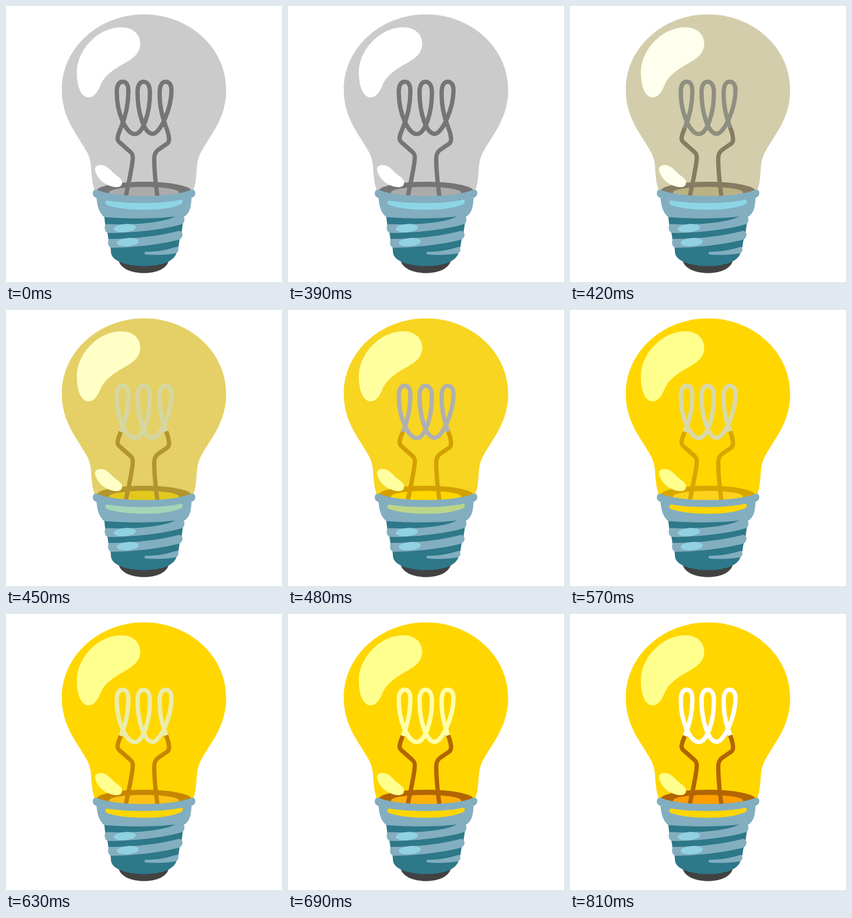
An HTML page with a canvas that plays this animation: 512 px wide and 512 px high, repeating every 2160 ms.

```html
<!DOCTYPE html>
<html lang="en">
<head>
<meta charset="utf-8">
<title>Light bulb</title>
<style>
html, body { margin: 0; width: 100%; height: 100%; overflow: hidden; background: #fff; }
canvas { display: block; width: 100vw; height: 100vh; object-fit: contain; }
</style>
</head>
<body>
<canvas id="stage" width="512" height="512"></canvas>
<script>
const ctx = document.getElementById('stage').getContext('2d');
const LOOP = 2160, STEP = 30;

const shape = d => new Path2D(d);
const oval = (x, y, rx, ry, tilt = 0) => {
  const p = new Path2D();
  p.ellipse(x, y, rx, ry, tilt, 0, Math.PI * 2);
  return p;
};

const glass = shape(`M256 15.5C340 15.5 408.5 78 408.5 155C408.5 208 380 238 363 269
  C352 288 355 302 352.5 318C351.5 329 349.5 338 345.5 346H166.5C162.5 338 160.5 329 159.5 318
  C157 302 160 288 149 269C132 238 103.5 208 103.5 155C103.5 78 172 15.5 256 15.5Z`);
const shine = shape(`M214 39.5C235 39.5 249 52 249 70C249 86 238 96 222 105
  C200 117 183 129 176 145C171 157 165 170 152 169.5C138 168 131 146 131.5 122
  C132 82 170 39.5 214 39.5Z`);
const glint = shape(`M166 307C162 297 172 293 182 296C190 299 195 306 202 312
  C208 317 217 321 215 330C213 338 201 337 191 333C178 328 169 318 166 307Z`);
const rim = oval(256, 343.5, 88, 17.5);
const floor = oval(256, 346, 65, 10.5);

const stems = shape(`M213 226C210 234 207 239 207 246C207 250 209 252 213 255L230 270
  C235 274 236 278 235 285C233 305 228 325 222 354
  M297 225C301 235 302.5 243 302.5 248C302.5 253 299 256 295 258L282 267
  C277 271 275 275 275 283C275 305 277 325 281 354`);
const coil = shape(`M213 226C222 205 227 180 227 158C227 146 223 140.5 217 140.5
  C209 140.5 205.5 148 205.5 160C205.5 199 223 237.5 239 237.5
  C254 237.5 267 199 267 161C267 147 262 140.5 255 140.5
  C248 140.5 244 148 244 160C244 197 256 237 272 237
  C286 237 307 190 307 156C307 146 303 140.5 296 140.5
  C289 140.5 285 148 285 162C285 190 291 208 297 225`);

const tip = shape('M209 472C212 487 233 495.5 256 495.5C279 495.5 299 487 302 472Z');
const screw = shape(`M182 388L184 405L188 420L190 432L194 449L195 459
  C198 474 226 482.5 256 482.5C288 482.5 311 474 316 459L320 446L322 433L326 418L328 404L330 388Z`);
const collar = shape(`M168 341C190 349.5 222 352.5 256 352.5C290 352.5 322 349.5 344 341
  C350 340 352 345 351 349C350 353 347 355 344 356C344 373 340 386 330 391
  C332 396 331 402 327 404.5C300 413 245 421 190 421C182 420 181 406 187 404.5
  C235 407 292 402 314 390.5C275 395 220 395 182 391.5
  C172 383 169 370 168 356C164 355 161 352 161 348C161 343 164 340 168 341Z`);
const thread = shape(`M192 432C235 432 285 427 321 417C329 418 330 429 322 433
  C290 442 238 448 195 448.5C188 446 188 434 192 432Z`);
const threadEnd = shape(`M259 456C281 456 301 452 317 446.5C321 448 321 456 316 458.5
  C298 462 277 462.5 259 461C256 460 256 457 259 456Z`);
const band = shape(`M188 361C230 367.5 290 367 324 359.5C329 359 329 364 326 367
  C310 375 285 378 256 378C225 378 200 374 187 369C183 366 183 361 188 361Z`);
const spots = [oval(220.5, 412, 20.5, 7.6, -0.08), oval(226, 438, 20.5, 7.6, -0.08)];

// Each colour track: time in ms, then colour.
const tracks = {
  glass: [[390, 'cbcbcb'], [420, 'd3cdab'], [450, 'e4d066'], [480, 'f7d521'], [510, 'ffd600']],
  shine: [[390, 'ffffff'], [420, 'ffffed'], [450, 'ffffc6'], [480, 'ffff9f'], [510, 'ffff8d']],
  stem: [[390, '757575'], [420, '867c62'], [450, 'b2952e'], [480, 'd3a000'], [570, 'd9a600'],
    [690, 'b26500']],
  floor: [[390, 'ababab'], [420, 'bbb283'], [450, 'e3c81c'], [480, 'ffd600'], [570, 'ffd21c'],
    [690, 'ffb00a'], [810, 'ff9e00']],
  coil: [[390, '757575'], [420, '8f8f80'], [450, 'd6d6a2'], [480, 'b0b0b0'], [570, 'd9d9a9'],
    [690, 'ffffaa'], [810, 'ffffff']],
  band: [[420, '8dd5e5'], [570, 'ffd600']]
};

const rgb = hex => [0, 2, 4].map(i => parseInt(hex.slice(i, i + 2), 16));

function colour(name, t) {
  const keys = tracks[name];
  const next = keys.findIndex(k => k[0] > t);
  if (next === 0) return '#' + keys[0][1];
  if (next < 0) return '#' + keys[keys.length - 1][1];
  const [t0, c0] = keys[next - 1], [t1, c1] = keys[next];
  const a = rgb(c0), b = rgb(c1), u = (t - t0) / (t1 - t0);
  return `rgb(${a.map((v, i) => Math.round(v + (b[i] - v) * u))})`;
}

function fill(path, style) {
  ctx.fillStyle = style;
  ctx.fill(path);
}

function line(path, style) {
  ctx.strokeStyle = style;
  ctx.stroke(path);
}

function draw(t) {
  ctx.fillStyle = '#fff';
  ctx.fillRect(0, 0, 512, 512);
  ctx.lineWidth = 8;
  ctx.lineJoin = 'round';

  fill(glass, colour('glass', t));
  fill(rim, colour('stem', t));
  fill(floor, colour('floor', t));
  line(stems, colour('stem', t));
  line(coil, colour('coil', t));
  fill(shine, colour('shine', t));
  fill(glint, colour('shine', t));

  fill(tip, '#424242');
  fill(screw, '#2d7889');
  for (const part of [collar, thread, threadEnd]) fill(part, '#82aec0');
  fill(band, colour('band', t));
  for (const spot of spots) fill(spot, '#91d2e2');
}

function tick() {
  const t = performance.now() % LOOP;
  draw(Math.floor(t / STEP) * STEP);
  requestAnimationFrame(tick);
}
tick();
</script>
</body>
</html>
```
